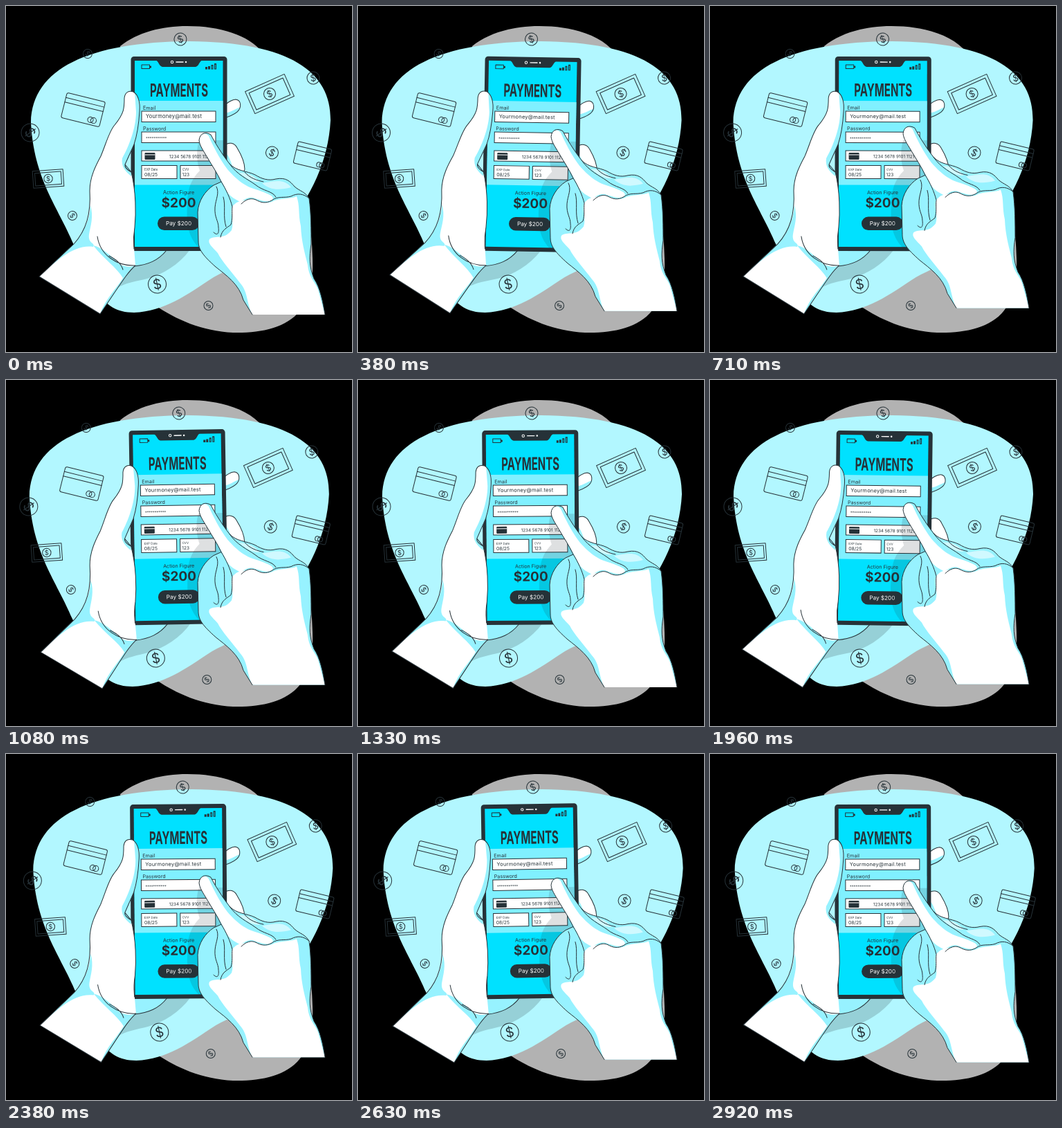
Recreate the animation shown at these times as an HTML page. Size 500x500 px, loop 2960 ms.

```html
<!DOCTYPE html>
<html lang="en">
<head>
<meta charset="utf-8">
<title>Payments</title>
<style>
  html, body { margin: 0; width: 100%; height: 100%; overflow: hidden; background: #000; }
  svg { display: block; width: 100%; height: 100%; }
  text { font-family: Inter, "Open Sans", sans-serif; fill: #263238; }
  .line { fill: none; stroke: #263238; stroke-width: 1; stroke-linecap: round; stroke-linejoin: round; }
  .box { fill: #fff; stroke: #263238; }
  .mid { text-anchor: middle; }
  .dark { fill: #263238; }
  .white { fill: #fff; }
  .shade { fill: #97f2ff; }
</style>
</head>
<body>
<svg viewBox="0 0 500 500">
  <path fill="#b2b2b2" d="M165 58C190 38 225 29 262 29C310 29 350 42 371 67L420 250C436 290 442 320 443 365C444 400 440 422 425 440C405 466 365 473 328 472C284 470 245 453 215 432Z"/>

  <g id="scene">
    <path fill="#b2f7ff" d="M36 168C38 90 120 52 265 51C410 52 470 95 469 165C466 225 440 275 405 320C375 365 340 370 300 392C260 418 230 441 185 443C135 443 125 400 98 345C75 290 40 250 36 168Z"/>
    <g id="icons" class="line"></g>
  </g>

  <g id="holder">
    <path fill="#263238" opacity=".2" d="M160 408C164 396 176 384 186 375L235 352H266C250 374 226 388 204 394C188 398 172 400 160 408Z"/>
    <!-- fingers behind the phone -->
    <path class="shade" d="M180 348L232 353C220 368 205 374 185 376L165 372Z"/>
    <path class="line" d="M232 353C220 368 205 374 185 376"/>
    <path class="white" d="M312 146C320 140 326 135 332 135C340 136 341 147 334 153C328 158 322 160 312 163Z"/>
    <path class="shade" d="M312 155C324 155 332 148 339 146C337 154 326 159 312 163Z"/>
    <path class="line" d="M312 146C320 140 326 135 332 135C340 136 341 147 334 153C328 158 322 160 312 163"/>
    <path class="white" d="M314 202C322 196 330 197 334 205C340 215 345 227 345 236C343 245 330 246 314 240Z"/>
    <path class="shade" d="M314 212C322 211 324 225 332 243L314 245Z"/>
    <path class="line" d="M314 202C322 196 330 197 334 205C340 215 345 227 345 236C343 245 330 246 314 240M315 293C322 292 324 300 321 307L315 312"/>

    <!-- phone -->
    <rect class="dark" x="180.500" y="73" width="139" height="281" rx="4.500"/>
    <rect fill="#00e1ff" x="186" y="79" width="127.500" height="269"/>
    <rect fill="#80f0ff" x="186" y="137" width="127.500" height="121.500"/>
    <path class="dark" d="M216 78C221 80 221 87 226 88H274C279 87 279 80 284 78Z"/>
    <g fill="none" stroke="#fff" stroke-linecap="round">
      <circle cx="240" cy="81" r="1.700"/><path stroke-width="1.400" d="M246 81H256"/>
      <circle cx="260" cy="81" r=".8"/>
    </g>
    <path class="line" d="M196 85H207.500V90.500H196ZM208.500 87H209.500V89H208.500Z"/>
    <path class="dark" d="M288 88H291V91.500H288ZM292 87H295V91.500H292ZM296.500 85H299.500V91.500H296.500ZM301 83H304V91.500H301Z"/>
    <path fill="#00e1ff" d="M298 86.500V90.500M297.600 86.500H298.400V90.500H297.600ZM302.100 84.500H302.900V90.500H302.100Z"/>
    <text class="mid" transform="translate(250 130.500) scale(.59 1)" font-size="25.500" font-weight="700">PAYMENTS</text>

    <g font-size="7.200">
      <text x="198" y="149.500">Email</text>
      <text x="198" y="179.500">Password</text>
      <rect class="box" x="196" y="152" width="107" height="15.500"/>
      <rect class="box" x="196" y="182" width="107" height="15.500"/>
      <rect class="box" x="196" y="209" width="107" height="15"/>
      <rect class="box" x="196" y="230.500" width="51" height="19"/>
      <rect class="box" x="252" y="230.500" width="51" height="19"/>
      <text x="202" y="162" font-size="7.500" letter-spacing=".2">Yourmoney@mail.test</text>
      <text x="202" y="193.500" font-size="5.500">***********</text>
      <rect class="dark" x="200.500" y="212" width="15" height="10" rx="1"/>
      <path stroke="#fff" d="M200.500 215H215.500"/>
      <text x="236" y="219.500" font-size="6.300">1234 5678 9101 1121</text>
      <text x="200" y="238" font-size="4.400">EXP Date</text>
      <text x="255" y="238" font-size="4.400">CVV</text>
      <text x="200" y="246" font-size="6.800">08/25</text>
      <text x="254.500" y="246" font-size="6.500">123</text>
      <text class="mid" x="249.500" y="272">Action Figure</text>
    </g>
    <text class="mid" x="249.500" y="291" font-size="19" font-weight="700">$200</text>
    <rect class="dark" x="219" y="304.500" width="60" height="19.500" rx="9.700"/>
    <text class="mid" x="249.500" y="317" font-size="8.200" style="fill:#fff">Pay $200</text>
    <path fill="#263238" opacity=".15" d="M279 194C274 212 276 226 280 238C268 250 262 264 262 287C260 320 265 338 284 354H319V194Z"/>

    <!-- holding hand -->
    <path class="white" d="M48 391L98 344C116 324 123 300 121 267C121 247 130 230 137 217C145 198 149 181 157 172C171 155 171 147 171 133C172 124 178 122 184 124C191 128 194 139 193 152C192 169 189 188 185 200L172 229L181 240C188 268 188 300 186 320C183 338 186 357 187 375C174 386 163 406 136 445Z"/>
    <path class="shade" d="M186 125C194 134 194 153 192 164C189 192 182 210 172 229L181 240V246C172 239 166 231 168 220C177 204 188 177 188 153Z"/>
    <path class="shade" d="M48 391L98 344C112 328 121 309 122 288C127 305 122 318 120 330C118 344 130 342 126 348C98 344 72 369 48 391Z"/>
    <path class="shade" d="M126 346C140 349 153 363 164 373C174 378 182 377 187 375C174 386 163 406 136 445C144 422 161 407 169 393C160 378 142 366 126 346Z"/>
    <path class="line" d="M136 445L48 391L98 344C116 324 123 300 121 267C121 247 130 230 137 217C145 198 149 181 157 172C171 155 171 147 171 133C172 124 178 122 184 124C191 128 194 139 193 152C192 169 189 188 185 200L172 229L181 240C188 268 188 300 186 320C183 338 185 346 185 351M132 333C136 360 160 376 187 375C174 386 163 406 136 445M149 361C158 366 166 371 169 381M172 229C171 233 174 236 181 240"/>
  </g>

  <g id="pointer">
    <path class="shade" d="M279 194C280 184 288 181 296 186C301 196 312 214 323 228C333 239 348 238 360 244C370 250 379 253 390 250C405 247 411 254 417 261C425 268 432 268 438 278C441 300 441 325 441 344C438 364 438 376 445 394C454 407 458 428 461 446H356L343 425C337 402 318 389 303 377C285 361 278 352 278 340L277 298C278 281 288 267 300 259L311 254C305 241 298 231 291 219C284 207 280 202 279 194Z"/>
    <path class="white" d="M279 194C280 184 288 182 293 188C299 202 308 220 320 236C337 255 347 261 364 266C380 272 390 275 384 281C376 284 370 281 362 279C350 273 345 281 338 283C333 280 324 276 319 268C311 250 300 234 291 219C284 207 280 202 279 194Z"/>
    <path class="white" d="M326 292C334 278 346 283 355 278C367 282 376 288 388 281C402 277 412 279 420 275C425 289 422 300 426 318C427 340 431 354 436 374C438 394 448 400 451 410L461 446H356C347 428 350 413 338 400C326 384 312 369 306 357C298 348 291 343 294 337C304 330 314 339 326 324C330 312 324 305 326 292Z"/>
    <path class="white" d="M337 241C350 240 359 246 367 254C357 256 346 249 337 241ZM370 256C388 253 402 249 412 262C396 266 382 267 370 256Z" opacity=".55"/>
    <path class="line" d="M356 446L343 425C337 402 318 389 303 377C285 361 278 352 278 340L277 298C278 281 288 267 300 259L311 254C305 241 298 231 291 219C284 207 280 202 279 194C280 184 288 181 296 186C301 196 312 214 323 228C333 239 348 238 360 244C370 250 379 253 390 250C405 247 411 254 417 261C425 268 432 268 438 278C441 300 441 325 441 344C438 364 438 376 445 394C454 407 458 428 461 446"/>
    <path class="line" d="M311 254C318 265 324 278 327 290C326 299 328 307 325 316C319 321 312 323 310 334M340 286C347 279 354 277 361 280C368 284 375 286 384 281C393 274 402 278 412 275C421 270 430 271 438 278M323 228C334 244 349 250 360 258C372 268 385 267 390 276M304 261C309 270 303 279 302 291C301 306 307 310 307 320C308 328 306 333 300 327M314 276C318 289 313 304 318 319M345 240C352 249 363 252 372 254"/>
  </g>
</svg>
<script>
const $ = id => document.getElementById(id);
const PERIOD = 1480;

// Icons are drawn around their own centre, then placed and turned.
const place = (x, y, turn, body) => `<g transform="translate(${x} ${y}) rotate(${turn})">${body}</g>`;
const rect = (w, h, rx = 0) => `<rect x="${-w / 2}" y="${-h / 2}" width="${w}" height="${h}" rx="${rx}"/>`;
const coin = r => `<circle r="${r}"/><text class="mid" stroke="none" y="${r * .53}" font-size="${r * 1.5}">$</text>`;
const bill = (w, h, r) => rect(w, h) + rect(w - r, h - r) + coin(r);
const card = (w, h) => rect(w, h, 2.5) +
  `<path d="M${-w / 2} ${-h * .3}H${w / 2}M${-w / 2} ${-h * .12}H${w / 2}"/>` +
  `<circle cx="${w * .24}" cy="${h * .31}" r="${h * .11}"/><circle cx="${w * .32}" cy="${h * .31}" r="${h * .11}"/>`;

const coins = [[252, 48, 9, -20], [118, 69, 6.5, 35], [444, 104, 9, -8], [35, 183, 13, 55],
  [384.5, 212, 9, 25], [96, 303, 6.5, 50], [218.5, 402, 13, -12], [292.5, 433, 6.5, -45]];
$("icons").innerHTML = coins.map(([x, y, r, turn]) => place(x, y, turn, coin(r))).join("") +
  place(381, 127, -24, bill(62, 35, 8.5)) + place(61, 249.5, -4, bill(44, 24.5, 6.2)) +
  place(111.5, 150, 14, card(57, 37)) + place(443, 217, 13.5, card(50, 32));

// Linear interpolation through [phase, value] stops.
function track(stops, p) {
  const i = stops.findIndex(s => s[0] > p);
  const [a, u] = stops[i - 1], [b, v] = stops[i];
  return u + (v - u) * (p - a) / (b - a);
}
const shake = [0, -1, 2, -4, 4, -4, 4, -4, 2, -1, 0].map((v, i) => [i / 10, v]);
const sway = [[0, 0], [.25, 1], [.75, -1], [1, 0]];
const lift = [[0, 0], [.5, -10], [1, 0]];

function draw() {
  const p = performance.now() % PERIOD / PERIOD;
  const move = (id, value) => $(id).setAttribute("transform", value);
  move("scene", `translate(${track(shake, p)} 0)`);
  move("holder", `rotate(${track(sway, p)} 196 259)`);
  move("pointer", `translate(0 ${track(lift, p)})`);
  requestAnimationFrame(draw);
}
draw();
</script>
</body>
</html>
```
